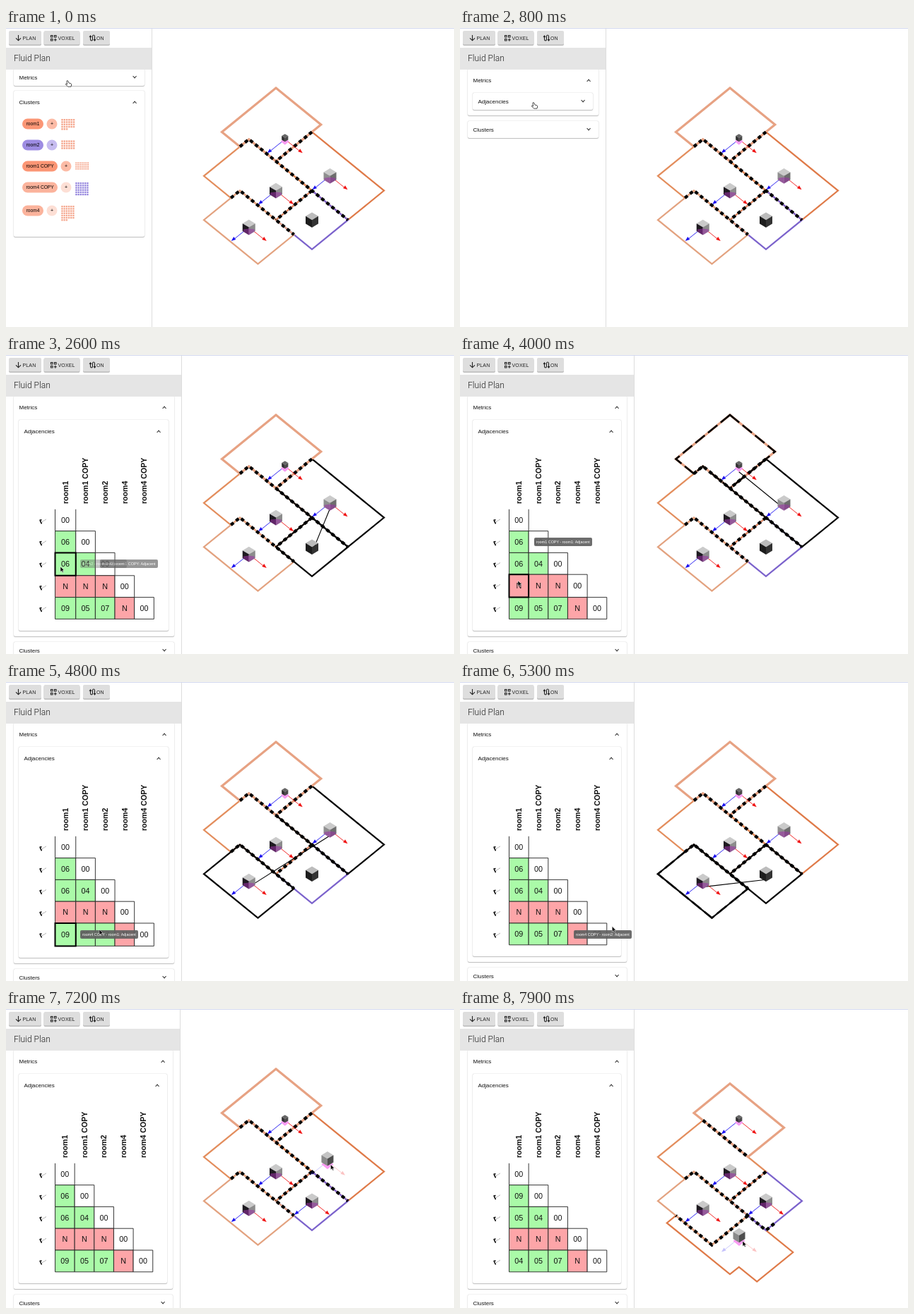
These frames come from a looping animation (634x424 px, 8000 ms). An HTML page:

```html
<!DOCTYPE html>
<html lang="en">
<head>
<meta charset="utf-8">
<title>Fluid Plan</title>
<style>
html, body { margin: 0; width: 100%; height: 100%; overflow: hidden; background: #fff; }
body { font: 8px "Liberation Sans", Arial, sans-serif; color: #111; }
#stage { position: relative; width: 634px; height: 424px; overflow: hidden; }
#stage > svg { position: absolute; left: 0; top: 0; }
#panel {
  position: absolute; left: 0; top: 0; height: 424px; box-sizing: border-box;
  width: var(--w); background: #fff; border-right: 1px solid #ddd; overflow: hidden;
}
#bar { position: absolute; left: 0; top: 0; }
#title {
  position: absolute; left: 0; right: 0; top: 28px; height: 31px; padding-left: 11px;
  background: #e5e5e5; color: #222; font: 300 12.1px/31px Roboto, sans-serif;
}
#list { position: absolute; left: 0; right: 0; top: 59px; bottom: 0; overflow: hidden; }
.card {
  position: absolute; left: 11px; right: 10px; background: #fff; border-radius: 2px;
  box-shadow: 0 1px 1px rgba(0,0,0,.22), 0 0 1.5px rgba(0,0,0,.28);
}
.head { position: relative; padding-left: 7.5px; height: calc(24px + 8px * var(--k)); line-height: calc(25.5px + 8px * var(--k)); }
.head::after {
  content: ""; position: absolute; right: 11.5px; top: 50%; width: 3.2px; height: 3.2px;
  border: solid #333; border-width: 0 1px 1px 0;
  transform: translateY(calc(-50% + 2.6px * var(--k) - 1.3px)) rotate(calc(45deg + 180deg * var(--k)));
}
.body { position: relative; overflow: hidden; }
.body svg { position: absolute; left: 0; top: 0; }
#metrics { --k: var(--m); top: -1px; }
#metrics > .body { height: calc(var(--m) * (34px + 273px * var(--a)) + var(--grow)); }
#adj { --k: var(--a); left: 7px; right: 8px; top: 2px; }
#adj > .body { height: calc(265px * var(--a) + var(--grow)); }
#clusters { --k: var(--c); top: calc(30px + var(--m) * (43px + 273px * var(--a)) + var(--grow)); }
#clusters > .body { height: calc(175px * var(--c)); }
.tip {
  position: absolute; height: 12px; padding: 0 3.5px; border-radius: 2px; white-space: nowrap;
  background: rgba(97,97,97,.92); color: #fff; font-size: 5.4px; line-height: 12px;
}
#topline { position: absolute; left: 0; top: 0; width: 634px; height: 1px; background: #d3d9f0; }
</style>
</head>
<body>
<div id="stage">
  <svg id="plan" width="634" height="424"></svg>
  <div id="panel">
    <svg id="bar" width="160" height="28" font-size="7" letter-spacing=".15" fill="#222">
      <g fill="#bbb"><rect x="4" y="5" width="46" height="20" rx="2"/><rect x="53.500" y="5" width="51" height="20" rx="2"/><rect x="109" y="5" width="38" height="20" rx="2"/></g>
      <g fill="#dedede"><rect x="4" y="4" width="46" height="19.500" rx="2"/><rect x="53.500" y="4" width="51" height="19.500" rx="2"/><rect x="109" y="4" width="38" height="19.500" rx="2"/></g>
      <g fill="none" stroke="#222" stroke-width="1.100">
        <path d="M17.500 10V17.500M14 14.300L17.500 17.800L21 14.300"/>
        <path d="M63.500 10.500h2.500v2.500h-2.500zM68.500 10.500h2.500v2.500h-2.500zM63.500 15.500h2.500v2.500h-2.500zM69.800 14.800v4M67.800 16.800h4"/>
        <path d="M119.500 12V16q0 2 1.500 2t1.500-2V12q0-2 1.500-2t1.500 2V17M118 13l1.500-2 1.500 2M124 16l1.500 2 1.500-2"/>
      </g>
      <text x="23.500" y="16.500">PLAN</text><text x="73.500" y="16.500">VOXEL</text><text x="128" y="16.500">ON</text>
    </svg>
    <div id="title">Fluid Plan</div>
    <div id="list">
      <div class="card" id="metrics">
        <div class="head">Metrics</div>
        <div class="body">
          <div class="card" id="adj">
            <div class="head">Adjacencies</div>
            <div class="body"><svg id="table" width="230" height="265" viewBox="18 124 230 265"></svg></div>
          </div>
        </div>
      </div>
      <div class="card" id="clusters">
        <div class="head">Clusters</div>
        <div class="body"><svg id="chips" width="184" height="175" viewBox="11 121 184 175"></svg></div>
      </div>
    </div>
  </div>
  <div class="tip"></div>
  <div class="tip"></div>
  <div id="topline"></div>
  <svg width="634" height="424">
    <g id="arrow"><path d="M0 0V7.500L1.800 5.900L3 8.600L4.300 8L3.100 5.400H5.400Z" fill="#000" stroke="#fff" stroke-width=".5"/></g>
    <g id="hand"><path d="M-1 0q1-1 1.700 0L2 3l3 .8q1 .6.6 2.200L5 8.200H.5L-2.500 5q-.3-1.200 1-.8L-.5 5Z" fill="#fff" stroke="#222" stroke-width=".8"/></g>
  </svg>
</div>
<script>
const LOOP = 8000;
const $ = id => document.getElementById(id);
const names = ['room1', 'room1 COPY', 'room2', 'room4', 'room4 COPY'];
const colors = ['#df7a48', '#e7a283', '#7b62cc', '#e38d5c', '#e3a27f'];
const widths = [2.2, 3.2, 2.2, 2.2, 2.2];

// Corners and shared walls on the isometric grid, as "i,j" pairs.
const layouts = [
  {
    rooms: ['5,1 13,1 13,5 5,5', '0,0 5,0 5,5 2,5 2,6 0,6', '9,5 13,5 13,9 9,9',
      '2,5 9,5 9,9 5,9 5,10 2,10', '5,9 11,9 11,13 5,13'],
    walls: ['2,6 2,5 13,5', '5,1 5,5', '9,5 9,9', '5,10 5,9 11,9'],
    values: ['00', '06 00', '06 04 00', 'N N N 00', '09 05 07 N 00']
  },
  {
    rooms: ['13,9 16,9 16,13 14,13 14,14 7,14 7,13 11,13 11,9', '1,1 7,1 7,5 1,5', '9,5 13,5 13,9 9,9',
      '2,5 9,5 9,9 5,9 5,10 2,10', '5,9 11,9 11,13 5,13'],
    walls: ['2,5 7,5', '9,5 9,9', '5,10 5,9 13,9 13,8', '11,9 11,13 7,13'],
    values: ['00', '09 00', '05 04 00', 'N N N 00', '04 05 07 N 00']
  }
];
const seeds = [[9, 3], [4, 3], [11, 7], [7, 7], [8, 11]];

// Hovered cells: start time, row, column.
const hovers = [[0], [1650, 2, 1], [2400, 2, 0], [3000, 1, 0], [3900, 3, 0],
  [4400, 4, 0], [4900, 4, 1], [5050, 4, 2], [5200]];
const track = [[0, 87, 75], [300, 87, 75], [800, 104, 106], [1050, 104, 106], [1550, 110, 279],
  [2350, 110, 291], [2550, 77, 300], [2850, 77, 300], [3150, 83, 262], [3800, 84, 263],
  [3980, 82, 320], [4350, 82, 322], [4500, 82, 354], [4650, 84, 354], [4800, 132, 351],
  [5080, 145, 352], [5400, 236, 345], [5800, 236, 345], [6050, 535, 212], [6200, 502, 217],
  [6650, 474, 214], [6900, 463, 214], [7100, 463, 214], [7800, 400, 329], [8000, 400, 329]];

const ramp = (t, a, b) => {
  const u = Math.min(1, Math.max(0, (t - a) / (b - a)));
  return u * u * (3 - 2 * u);
};
const iso = (i, j) => [382 + 12.75 * (i - j), 85 + 10.4 * (i + j)];
const path = s => 'M' + s.split(' ').map(p => iso(...p.split(',').map(Number)).join(' ')).join('L');
const line = (d, color, w, extra = '') =>
  `<path d="${d}" fill="none" stroke="${color}" stroke-width="${w}" ${extra}/>`;
const face = (pts, color, o = 1) => `<polygon points="${pts}" fill="${color}" opacity="${o}"/>`;

const cache = {};
function put(id, html) {
  if (cache[id] !== html) $(id).innerHTML = cache[id] = html;
}

function axes(x, y, o) {
  const axis = (s, c) => line(`M${x} ${y}l${s * 20} 16`, c, .9) +
    face(`${x + s * 25},${y + 19.5} ${x + s * 18.5},${y + 17.5} ${x + s * 21.5},${y + 13.5}`, c);
  return `<g opacity="${o}">${axis(-1, '#1c12f0')}${axis(1, '#f01414')}</g>`;
}

function cube(x, y, w, top, left, right) {
  const h = w * .6, b = y + w * 1.2;
  return face(`${x},${y - 2 * h} ${x + w},${y - h} ${x},${y} ${x - w},${y - h}`, top) +
    face(`${x - w},${y - h} ${x},${y} ${x},${b} ${x - w},${b - h}`, left) +
    face(`${x + w},${y - h} ${x},${y} ${x},${b} ${x + w},${b - h}`, right);
}

function diamond(x, y, w, color, o) {
  const h = w * .82;
  return face(`${x},${y - h} ${x + w},${y} ${x},${y + h} ${x - w},${y}`, color, o);
}

function voxel(k, x, y, active, dragged) {
  if (k === 1) return axes(x, y, 1) + diamond(x, y + 3, 6, '#f79bf2', 1) + cube(x, y - 2, 4.6, '#666', '#333', '#4a4a4a');
  if (dragged) return axes(x, y, .25) + diamond(x, y + 4, 8.5, '#fa9cf3', 1) + cube(x, y - 4, 8.5, '#c4c4c4', '#8a8a8a', '#4d4d4d');
  if (!active) return cube(x, y, 9, '#bcbcbc', '#1d1d1d', '#333');
  const sides = k ? ['#1e1a20', '#8c8c8c'] : ['#8f8f8f', '#6d6d6d'];
  return axes(x, y, 1) + cube(x, y, 9, '#cacaca', ...sides) +
    face(`${x},${y + 2} ${x + 8},${y + 3} ${x + 8},${y + 6} ${x},${y + 11} ${x - 8},${y + 6} ${x - 8},${y + 3}`, '#9b2fa5', .55);
}

function drawPlan(layout, pair, fading, drag, dragging) {
  const dark = k => pair.includes(k);
  // Black outlines cover coloured ones; the thickest outline stays on top.
  const order = [0, 2, 3, 4].sort((a, b) => dark(a) - dark(b)).concat(1);
  let s = '';
  for (const k of order) {
    const d = path(layout.rooms[k]) + 'Z', half = fading && pair[0] === k;
    s += line(d, dark(k) && k !== 1 ? '#000' : colors[k], widths[k]);
    if (dark(k) && k === 1 || half) s += line(d, '#000', 2.6, half ? 'stroke-dasharray="17 6"' : '');
  }
  for (const w of layout.walls) s += line(path(w), '#000', 4.4, 'stroke-dasharray="5 4.300"');
  const at = seeds.map((p, k) => {
    const [x, y] = iso(...p);
    return k ? [x, y] : [x + (395 - x) * drag, y + (325 - y) * drag];
  });
  if (pair.length) {
    const [p, q] = pair.map(k => `${at[k][0]} ${at[k][1] + 8}`);
    s += line(`M${p}L${q}`, '#000', 1.1);
  }
  at.forEach((p, k) => s += voxel(k, ...p, k !== 2 || dragging, !k && dragging));
  put('plan', s);
}

function drawTable(values, hover, wide) {
  const [, hr, hc] = hover;
  // The thick border of a hovered cell pushes later rows and columns away.
  const rowY = r => 218.8 + r * 30.8 + (r > hr ? 1.6 : 0);
  const colX = c => 69.5 + c * 27.65 + (wide && c > hc ? 1.6 : 0);
  let s = '', mark = '';
  names.forEach((name, r) => {
    const y = rowY(r), ch = rowY(r + 1) - y, cx = (colX(r) + colX(r + 1)) / 2;
    s += `<text transform="translate(${cx + 3.8} 211) rotate(-90)" font-size="10.600" font-weight="700" fill="#111">${name}</text>`;
    s += line(`M47.500 ${y + 15.5}l3-.6M48 ${y + 15.5}l2.500 5`, '#000', 1.5) +
      line(`M51 ${y + 18}l6-4`, '#555', .8, 'stroke-dasharray="1.200 1"');
    values[r].split(' ').forEach((v, c) => {
      const x = colX(c), cw = colX(c + 1) - x, fill = c === r ? '#fff' : v === 'N' ? '#fda5a8' : '#aafaa8';
      s += `<rect x="${x}" y="${y}" width="${cw}" height="${ch}" fill="${fill}"/>`;
      s += line(`M${x} ${y}v${ch}h${cw}v${-ch}${r ? 'z' : ''}`, '#222', .9);
      s += `<text x="${x + cw / 2}" y="${y + ch / 2 + 3.8}" font-size="10.800" text-anchor="middle" fill="#111">${v}</text>`;
      if (hr === r && hc === c) mark = line(`M${x} ${y}h${cw}v${ch}h${-cw}z`, '#000', 2);
    });
  });
  put('table', s + mark);
}

function drawTip(el, h, values, o) {
  const show = h.length > 1 && o > 0;
  el.style.opacity = show ? o : 0;
  if (!show) return;
  const [, r, c] = h;
  const kind = values[r].split(' ')[c] === 'N' ? 'Neutral' : 'Adjacent';
  el.textContent = `${names[r]} - ${names[c]}: ${kind}`;
  el.style.left = 104.5 + c * 28 + 'px';
  el.style.top = 228 + r * 31 + 'px';
}

// Chips: room, y, colour, light colour, dot colour, columns, dots, pitch.
const orange = '#f5a78e';
$('chips').innerHTML = [
  [0, 136, '#fb9675', '#fcbba6', orange, 6, 27, 3.3],
  [2, 166, '#9d8ce2', '#c6bcf0', orange, 6, 24, 3.3],
  [1, 196, '#fb9675', '#fcbba6', orange, 7, 28, 2.8],
  [4, 226, '#fbb39c', '#fddfd5', '#9384dd', 6, 36, 3.2],
  [3, 259, '#fbb39c', '#fddfd5', orange, 6, 39, 3.2]
].map(([k, y, main, light, dot, cols, n, step]) => {
  const w = names[k].length > 5 ? 50 : 30, x = 23 + w, top = y - Math.min(7, Math.ceil(n / cols) * step / 2);
  let s = `<rect x="23" y="${y - 7.5}" width="${w}" height="15" rx="7.500" fill="${main}"/>
    <text x="${23 + w / 2}" y="${y + 2.4}" font-size="6.600" text-anchor="middle">${names[k]}</text>
    <circle cx="${x + 12}" cy="${y}" r="7.500" fill="${light}"/>
    <text x="${x + 12}" y="${y + 2.3}" font-size="7" text-anchor="middle">+</text>`;
  for (let i = 0; i < n; i++)
    s += `<rect x="${x + 25.3 + i % cols * step}" y="${top + Math.floor(i / cols) * step}" width="${step - .9}" height="${step - .9}" fill="${dot}"/>`;
  return s;
}).join('');

const tips = document.querySelectorAll('.tip');
const root = $('stage').style;

function draw(t) {
  const m = ramp(t, 100, 480), a = ramp(t, 950, 1400);
  const n = hovers.findLastIndex(h => t >= h[0]);
  const now = hovers[n], prev = hovers[Math.max(0, n - 1)], age = t - now[0];
  const hovered = now.length > 1, lag = age < 150, wide = hovered && !lag;
  const layout = layouts[t < 7450 ? 0 : 1];

  root.setProperty('--m', m);
  root.setProperty('--a', a);
  root.setProperty('--c', 1 - m);
  root.setProperty('--w', 207 + 40 * a + (wide ? 2 : 0) + 'px');
  root.setProperty('--grow', hovered ? '2px' : '0px');

  drawTable(layout.values, now, wide);
  drawPlan(layout, (lag ? prev : now).slice(1), lag, ramp(t, 7100, 7800), t >= 7100);
  drawTip(tips[0], prev, layout.values, 1 - ramp(age, 120, 350));
  drawTip(tips[1], now, layout.values, ramp(age, 120, 300));

  const i = Math.max(1, track.findIndex(p => p[0] > t));
  const [t0, x0, y0] = track[i - 1], [t1, x1, y1] = track[i], u = ramp(t, t0, t1);
  const pos = `translate(${x0 + (x1 - x0) * u} ${y0 + (y1 - y0) * u})`;
  const hand = t < 1100;
  for (const id of ['arrow', 'hand']) {
    $(id).setAttribute('transform', pos);
    $(id).style.display = (id === 'hand') === hand ? '' : 'none';
  }
}

const start = performance.now();
function tick() {
  draw((performance.now() - start) % LOOP);
  requestAnimationFrame(tick);
}
tick();
</script>
</body>
</html>
```
